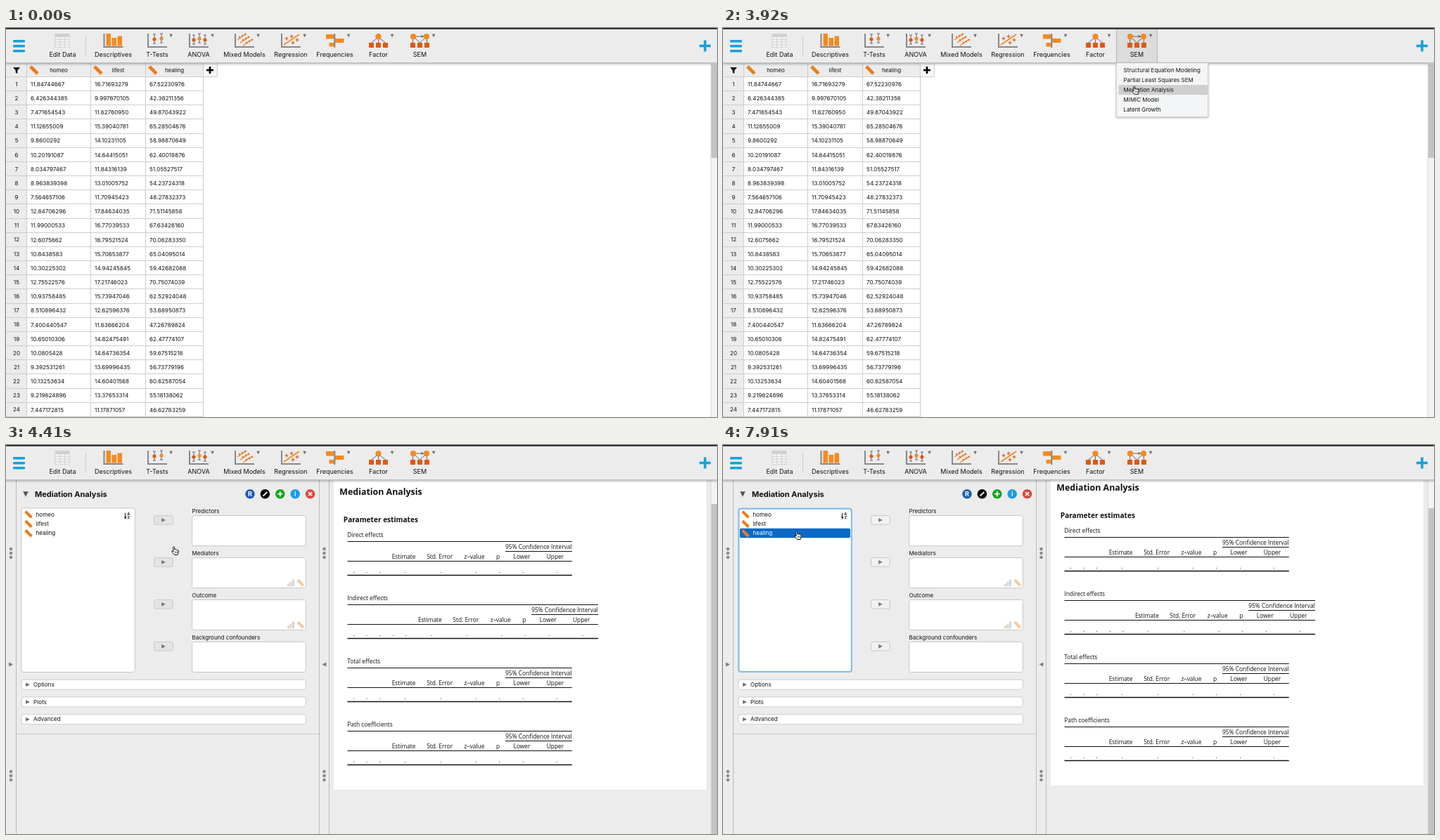
These frames come from a looping animation (1011x554 px, 8 s). An HTML page with a canvas:

```html
<!DOCTYPE html>
<html lang="en">
<head>
<meta charset="utf-8">
<title>Mediation Analysis</title>
<style>
html, body { margin: 0; width: 100%; height: 100%; overflow: hidden; background: #fff; }
canvas { display: block; }
</style>
</head>
<body>
<canvas id="stage" width="1011" height="554"></canvas>
<script>
const g = document.getElementById('stage').getContext('2d');
const LOOP = 8000, STEP = 70;
const UI = 'Inter, sans-serif', DOC = '"Open Sans", "Noto Sans", sans-serif';
const ORANGE = '#f58a1f', RUST = '#dc5a14', AXIS = '#85888b', BLUE = '#16a0dc', BG = '#ececec';
const VARS = ['homeo', 'lifest', 'healing'];

// Two columns follow the first one linearly, with seeded noise
const HOMEO = `11.84744667 6.426344385 7.471654543 11.12655009 9.8600292 10.20191087
8.034797467 8.963839398 7.564657106 12.84706296 11.99000533 12.6075662
10.8438583 10.30225302 12.75522576 10.93758485 8.510896432 7.400440547
10.65010306 10.0805428 9.392531261 10.13253634 9.219624896 7.447172815`.split(/\s+/);
function noise(n) {
  const v = Math.sin(n * 12.9898) * 43758.5453;
  return (v - Math.floor(v)) * 2 - 1;
}
const DATA = HOMEO.map((s, i) => [
  s,
  (3.5 + 1.08 * s + 0.5 * noise(i + 1)).toPrecision(10),
  (15 + 4.5 * s + 2 * noise(i + 50)).toPrecision(10)
]);

// ---- drawing helpers ----
function box(x, y, w, h, fill) { g.fillStyle = fill; g.fillRect(x, y, w, h); }
function line(x1, y1, x2, y2, color, width = 1) {
  g.strokeStyle = color; g.lineWidth = width;
  g.beginPath(); g.moveTo(x1, y1); g.lineTo(x2, y2); g.stroke();
}
function disc(x, y, r, fill) { g.fillStyle = fill; g.beginPath(); g.arc(x, y, r, 0, 7); g.fill(); }
function pill(x, y, w, h, r, fill) { g.fillStyle = fill; g.beginPath(); g.roundRect(x, y, w, h, r); g.fill(); }
function frame(x, y, w, h, r, fill, edge, width = 1) {
  pill(x, y, w, h, r, fill);
  g.strokeStyle = edge; g.lineWidth = width; g.stroke();
}
function text(s, x, y, size, o = {}) {
  g.font = `${o.weight || 400} ${size}px ${o.font || UI}`;
  g.textAlign = o.align || 'left';
  g.fillStyle = o.color || '#111';
  g.fillText(s, x, y + size * 0.36);
}
// Triangle turned clockwise in quarter turns, starting from the right
function tri(x, y, r, turn, fill) {
  g.save(); g.translate(x, y); g.rotate(turn * Math.PI / 2);
  g.fillStyle = fill; g.beginPath();
  g.moveTo(r, 0); g.lineTo(-r, -r); g.lineTo(-r, r); g.fill(); g.restore();
}
function plus(x, y, r, width, color) {
  line(x - r, y, x + r, y, color, width);
  line(x, y - r, x, y + r, color, width);
}
function ruler(x, y, size = 1, alpha = 1) {
  g.save(); g.globalAlpha = alpha; g.translate(x, y); g.rotate(Math.PI / 4); g.scale(size, size);
  box(-7.2, -2.4, 14.4, 4.8, '#f08019');
  for (let i = -5; i <= 5; i += 2.5) line(i, -2.4, i, -0.4, '#b9560c', 0.7);
  g.restore();
}

// ---- toolbar ----
function axes(x) {
  line(x - 13, 8, x - 13, 28, AXIS, 2);
  line(x - 14, 27, x + 14, 27, AXIS, 2);
}
function errorBar(x, y, fill) {
  line(x, y - 7, x, y + 6, '#666');
  [y - 7, y + 6].forEach(end => line(x - 2, end, x + 2, end, '#666'));
  disc(x, y, 2.6, fill);
}
function leaves(x) { [-10, 0, 10].forEach(d => box(x + d - 3.5, 21, 7, 7, RUST)); }
const ICONS = {
  'Edit Data': x => {
    box(x - 11, 8, 21, 20, '#d0d0d0');
    for (let r = 0; r < 4; r++) for (let c = 0; c < 3; c++)
      box(x - 10 + c * 6.7, 13 + r * 3.8, 5.7, 2.8, '#f3f3f3');
  },
  'Descriptives': x => {
    axes(x);
    [8, 14, 11.5].forEach((y, i) => box(x - 10 + i * 8, y, 6.5, 25.5 - y, ORANGE));
  },
  'T-Tests': x => { axes(x); errorBar(x - 4, 16, RUST); errorBar(x + 6, 15, ORANGE); },
  'ANOVA': x => {
    axes(x);
    [17, 15, 17].forEach((y, i) => errorBar(x - 7 + i * 8, y, i === 1 ? ORANGE : RUST));
  },
  'Mixed Models': x => {
    axes(x);
    for (let i = 0; i < 3; i++) {
      line(x - 10 + i * 4, 17 + i * 4, x + 3 + i * 4, 8 + i * 4, ORANGE, 1.4);
      for (let j = 0; j < 3; j++) plus(x - 7 + i * 5 + j * 4, 13 + i * 4 - j * 2, 1.4, 0.9, RUST);
    }
  },
  'Regression': x => {
    axes(x); line(x - 10, 24, x + 12, 9, ORANGE, 1.8);
    [[-6, 15], [1, 12], [3, 21], [9, 17]].forEach(([a, y]) => plus(x + a, y, 2.4, 1.2, RUST));
  },
  'Frequencies': x => {
    box(x - 12.5, 9, 12, 6.5, ORANGE); box(x, 15, 13, 6, ORANGE); box(x - 8, 21, 8, 5.5, ORANGE);
    line(x - 0.2, 8, x - 0.2, 28, AXIS, 2);
  },
  'Factor': x => {
    [-10, 0, 10].forEach(d => line(x, 13, x + d, 21, '#666'));
    leaves(x); disc(x, 12.2, 4.2, ORANGE);
  },
  'SEM': x => {
    line(x - 6, 12, x + 5, 12, '#666'); tri(x + 4, 12, 2, 0, '#666');
    [-1, 1].forEach(s => [0, 10].forEach(d => line(x + s * 9.5, 12, x + s * d, 21, '#666')));
    leaves(x); [-9.5, 9.5].forEach(d => disc(x + d, 12.2, 4.1, ORANGE));
  }
};
const SPOTS = [80.5, 152.5, 215, 274, 339, 405, 467.5, 529.5, 588.5];

function toolbar(open) {
  const shade = g.createLinearGradient(0, 50, 0, 54);
  shade.addColorStop(0, 'rgba(0,0,0,.22)'); shade.addColorStop(1, 'rgba(0,0,0,0)');
  box(0, 50, 1011, 4, shade);
  box(0, 0, 1011, 50, BG);
  if (open) {
    box(559, 2, 58.5, 48, '#dcdcdc');
    [559.5, 617.5].forEach(x => line(x, 2, x, 50, '#b4b4b4'));
  }
  line(0, 49.7, 1011, 49.7, '#b2b2b2');
  box(0, 0, 1011, 1.7, '#1a1a22');
  for (let i = 0; i < 3; i++) pill(10, 17 + i * 7, 17, 3.4, 1.2, BLUE);
  line(113.5, 11, 113.5, 40, '#cfcfcf');
  Object.keys(ICONS).forEach((name, i) => {
    ICONS[name](SPOTS[i]);
    text(name, SPOTS[i], 37.3, 9, { align: 'center' });
    if (i > 1) tri(SPOTS[i] + 19.6, 11, 2.3, 1, '#6c6c6c');
  });
  plus(994, 25.5, 8, 3.6, BLUE);
}

const ITEMS = ['Structural Equation Modeling', 'Partial Least Squares SEM', 'Mediation Analysis', 'MIMIC Model', 'Latent Growth'];
function menu(hover) {
  g.save();
  g.shadowColor = 'rgba(0,0,0,.3)'; g.shadowBlur = 3; g.shadowOffsetY = 1;
  box(559, 50, 131, 77, '#c2c2c2');
  g.restore();
  box(559.7, 50, 129.6, 76.3, '#f4f5f6');
  ITEMS.forEach((s, i) => {
    const y = 60 + i * 14.05;
    if (i === hover) box(562.5, y - 7, 126.5, 14, '#cfcfcf');
    text(s, 569.5, y, 8);
  });
}

// ---- data sheet ----
const EDGES = [29.5, 120.5, 198.5, 280.5], PITCH = 20.165;
function sheet() {
  box(0, 50, 1011, 504, '#fff');
  box(0, 50, 281, 20, BG); box(0, 50, 30, 504, BG); box(281, 50, 20, 20, '#f7f7f7');
  for (let i = 0; i <= 24; i++) {
    const y = Math.round(69 + i * PITCH) + 0.5;
    line(0, y, i ? 281 : 301, y, '#cdcdcd');
  }
  EDGES.forEach(x => line(x, 50, x, 554, '#cdcdcd'));
  line(300.5, 50, 300.5, 70, '#cdcdcd');
  g.fillStyle = '#111';
  g.fill(new Path2D('M10 56H20L16.3 60.5V65L13.7 63.5V60.5Z'));
  plus(290, 60, 5, 2.6, '#000');
  VARS.forEach((s, c) => {
    ruler(EDGES[c] + 10.3, 60);
    text(s, (EDGES[c] + EDGES[c + 1]) / 2, 59.7, 7.9, { align: 'center' });
  });
  DATA.forEach((row, i) => {
    const y = 79.8 + i * PITCH;
    text(i + 1, 15, y, 8, { align: 'center' });
    row.forEach((s, c) => text(s, EDGES[c] + 5.6, y, 8.1));
  });
  bar(52, 185);
}
function bar(top, bottom) {
  box(1002, 50, 9, 504, '#f3f3f3');
  line(1002.3, 50, 1002.3, 554, '#d8d8d8');
  box(1003, top, 8, bottom - top, '#c3c3c3');
}

// ---- analysis form ----
function splitter(x, turn) {
  [154, 471].forEach(y => [-6, 0, 6].forEach(d => disc(x, y + d, 2.3, '#8b8b8b')));
  tri(x, 312.5, 2.9, turn, '#777');
}
const BADGES = [
  ['#1b5fae', x => text('R', x, 69.8, 9, { weight: 700, color: '#fff', align: 'center' })],
  ['#050505', x => line(x - 2.8, 72.5, x + 3, 66.8, '#fff', 1.8)],
  ['#12a41c', x => plus(x, 69.7, 3.6, 1.7, '#fff')],
  ['#189be8', x => text('i', x, 69.7, 9.5, { weight: 600, color: '#fff', align: 'center' })],
  ['#dc4a3d', x => [-2.6, 2.6].forEach(d => line(x - d, 67.1, x + d, 72.3, '#fff', 1.6))]
];
function levels(x, y) {
  g.save(); g.globalAlpha = 0.4;
  for (let i = 0; i < 3; i++)
    box(x - 5 + i * 3.5, y + 1 - i * 3, 3, 4 + i * 3, i === 1 ? ORANGE : '#6da9cf');
  g.restore();
}
function form(t, bottom, hover) {
  const picked = t >= 7700, glow = picked ? Math.min(1, (t - 7630) / 210) : 0;
  box(0, 50, 1011, 504, BG);
  [14.5, 445.5, 459.5].forEach(x => line(x, 50, x, 554, '#b9b9b9'));
  splitter(7, 0); splitter(452.5, 2);

  g.save(); g.beginPath(); g.rect(15, 50, 430, bottom - 50); g.clip();
  tri(28, 70, 3.8, 1, '#555');
  text('Mediation Analysis', 41, 69.7, 11, { weight: 700 });
  BADGES.forEach(([fill, mark], i) => {
    const x = 347 + i * 21.4;
    disc(x, 69.7, 6.8, fill); mark(x);
  });

  frame(22, 90, 161.3, 233.5, 3, '#fff', '#c6c6c6');
  if (glow) {
    g.save(); g.globalAlpha = glow;
    frame(22.5, 90.7, 160.3, 232.4, 3, '#fff', '#7dbdee', 2);
    g.restore();
  }
  VARS.forEach((s, i) => {
    const y = 98.8 + i * 13.4, on = picked && i === 2;
    if (on || i === hover) pill(24, y - 6.8, 157, 13.4, 2, on ? '#0a69c7' : '#d9f1fc');
    ruler(32, y + 0.2, 0.85);
    text(s, 42.5, y - 0.2, 8.1, { color: on ? '#fff' : '#111' });
  });
  pill(166.5, 95, 11.5, 12, 2, '#f0f0f0');
  line(169.7, 97, 169.7, 104, '#222', 1.1); tri(169.7, 104, 1.8, 1, '#222');
  ['A', 'Z'].forEach((s, i) => text(s, 174.3, 98.6 + i * 5, 5, { weight: 600, align: 'center' }));

  ['Predictors', 'Mediators', 'Outcome', 'Background confounders'].forEach((s, i) => {
    const y = i * 59.95, tone = Math.round(228 + 13 * glow);
    frame(210.7, 100.6 + y, 26.6, 12.6, 2, `rgb(${tone},${tone},${tone})`, '#c8c8c8');
    tri(224, 106.9 + y, 2.9, 0, '#777');
    text(s, 264.5, 94.5 + y, 8.1);
    frame(264.6, 100.5 + y, 161.7, 43.2, 3, '#fff', '#c6c6c6');
    if (i === 1 || i === 2) { levels(405, 136.5 + y); ruler(418.7, 136.3 + y, 0.8, 0.4); }
  });
  ['Options', 'Plots', 'Advanced'].forEach((s, i) => {
    const y = 341.2 + i * 24.75;
    frame(22, y - 7, 404.3, 14, 3, '#fff', '#cdcdcd');
    tri(31, y, 2.8, 0, '#666');
    text(s, 39, y - 0.2, 8.1);
  });
  g.restore();
  line(15, bottom - 0.5, 445, bottom - 0.5, '#cacaca');
}

// ---- results ----
function doc(s, x, y, size, weight, align) { text(s, x, y, size, { font: DOC, weight, align }); }
function cell(s, x, y) { doc(s, x, y, 8.4, 500, 'center'); }
const COLUMNS = { 'Estimate': 565.6, 'Std. Error': 616.6, 'z–value': 666, 'p': 699.5, 'Lower': 733.5, 'Upper': 781 };
function table(title, y, keys) {
  const shift = (keys - 3) * 18.6, right = 804.8 + shift;
  const rule = (x, dy, w) => line(x, Math.round(y + dy) - 0.5, right, Math.round(y + dy) - 0.5, '#111', w);
  doc(title, 485.3, y, 8.4, 500);
  rule(485.5, 10, 1);
  cell('95% Confidence Interval', 757.3 + shift, y + 17);
  rule(710 + shift, 24, 1);
  rule(485.5, 38, 1);
  for (let i = 0; i < keys; i++) cell('.', 494.5 + i * 18.6, y + 51);
  for (const name in COLUMNS) {
    const x = COLUMNS[name] + shift;
    cell(name, x, y + 31);
    cell('.', x + 2, y + 51);
  }
  rule(485.5, 58, 1.7);
}
function results(t) {
  const ready = t >= 4200;
  const p = Math.min(1, Math.max(0, (t - 4200) / 362));
  const off = Math.round(34 * (1 - p) ** 2);
  g.save(); g.beginPath(); g.rect(460, 50, 542, 504); g.clip();
  doc('Results', 474.5, 26 + off, 14.2, 700);
  if (ready) {
    box(466, 43.5 + off, 530, 441.3, '#fff');
    doc('Mediation Analysis', 474.3, 60.8 + off, 12.4, 700);
    doc('Parameter estimates', 479.8, 100.2 + off, 10.1, 700);
    ['Direct effects', 'Indirect effects', 'Total effects', 'Path coefficients']
      .forEach((s, i) => table(s, 122 + i * 89.9 + off, i === 1 ? 5 : 3));
  } else if (t >= 4060) {
    box(466, 77.5, 333, 81, '#fff');
    doc('Mediation Analysis', 474.3, 94.8, 12.4, 700);
    doc('Waiting for initialization (of the engine) of module: SEM', 479.8, 134.3, 9.3, 700);
    const a = t / 120;
    g.lineWidth = 1.5;
    g.strokeStyle = '#ddd'; g.beginPath(); g.arc(615, 95, 4.3, 0, 7); g.stroke();
    g.strokeStyle = '#888'; g.beginPath(); g.arc(615, 95, 4.3, a, a + 4.2); g.stroke();
  }
  g.restore();
  if (ready) bar(90 - off, 554); else bar(57, 541);
}

// ---- pointer: arrival time and place; each move takes MOVE ms ----
const MOVE = 280;
const STOPS = [
  [70, 54, 541], [350, 393, 39], [840, 498, 130], [1680, 578, 28], [1890, 601, 8], [1960, 584, 25],
  [3010, 584, 50], [3290, 583, 90], [3850, 581, 82], [4410, 235, 144], [4550, 173, 123],
  [5110, 140, 108], [5460, 108, 94], [6020, 105, 107], [6440, 101, 122]
];
const HAND = new Path2D('M2.6 1.6Q3.5 .2 4.5 1.6L4.9 5Q6 4.2 6.8 5.2Q8 4.7 8.6 5.7Q10.2 5.5 10.4 7L10 9.6L9 12.5H4.5L1 8.2Q.6 6.8 2 6.8L3.2 7.8Z');
const ARROW = new Path2D('M.5 .5V11.5L3 9.3L4.8 13.3L6.6 12.5L4.9 8.7H8.4Z');

function pointer(t) {
  if (t < STOPS[0][0]) return null;
  const i = STOPS.findIndex(s => s[0] > t);
  if (i < 0) return STOPS.at(-1).slice(1);
  const [t0, x0, y0] = STOPS[i - 1], [t1, x1, y1] = STOPS[i];
  const start = Math.max(t0, t1 - MOVE);
  const u = Math.max(0, (t - start) / (t1 - start)), e = u * u * (3 - 2 * u);
  return [x0 + (x1 - x0) * e, y0 + (y1 - y0) * e];
}
function drawPointer([x, y], hand) {
  const shape = hand ? HAND : ARROW;
  g.save(); g.translate(x, y); g.lineJoin = 'round'; g.lineWidth = 1;
  g.fillStyle = hand ? '#fff' : '#000'; g.strokeStyle = hand ? '#111' : '#fff';
  g.fill(shape); g.stroke(shape);
  if (hand) [5.4, 7, 8.6].forEach(d => line(d, 7.4, d, 10.2, '#333', 0.7));
  g.restore();
}

function draw(t) {
  const at = pointer(t), analysis = t >= 3990, open = t >= 2520 && !analysis;
  if (analysis) {
    const bottom = Math.min(412, 396 + (t - 4130) * (t < 4130 ? 0.4 : 0.115));
    form(t, bottom, at[0] < 180 ? Math.floor((at[1] - 90) / 13.4) : -1);
    results(t);
  } else sheet();
  toolbar(open);
  if (open) menu(Math.floor((at[1] - 52) / 14.1));
  if (at) drawPointer(at, t >= 2520 || at[1] < 46);
}

function tick() {
  const t = performance.now() % LOOP;
  draw(Math.floor(t / STEP) * STEP);
  requestAnimationFrame(tick);
}
tick();
</script>
</body>
</html>
```
